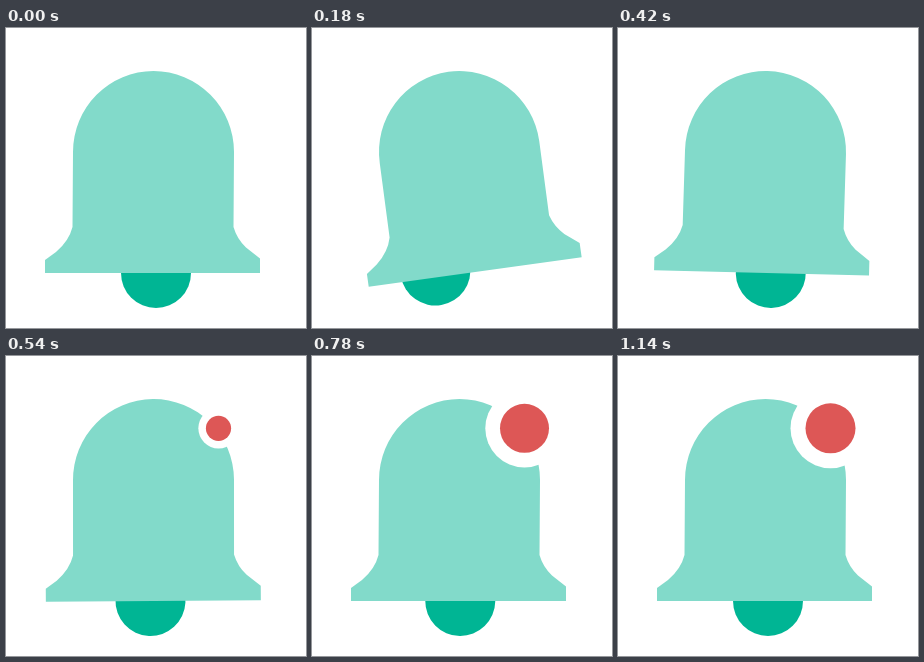
Animation of 300x300 px, one loop 1350 ms. Source, as an HTML page:

```html
<!DOCTYPE html>
<html lang="en">
<head>
<meta charset="utf-8">
<title>Bell notification</title>
<style>
  html, body { margin: 0; width: 100%; height: 100%; overflow: hidden; background: #fff; }
  svg { display: block; width: 100vw; height: 100vh; }
</style>
</head>
<body>
<svg viewBox="0 0 300 300">
  <circle id="clapper" cx="150" cy="245" r="35" fill="#00b594"/>
  <path id="bell" fill="#82daca" d="M39 245V232L50 224Q63 213 66.5 199L67 124A80.5 81 0 0 1 228 124L227.5 199Q231 211 240 219.5L254 230.5V245Z"/>
  <g id="badge">
    <circle r="40" fill="#fff"/>
    <circle r="25" fill="#dd5756"/>
  </g>
</svg>
<script>
  const LOOP = 1350, STEP = 30;
  const [clapper, bell, badge] = ['clapper', 'bell', 'badge'].map(id => document.getElementById(id));

  const smooth = p => p * p * (3 - 2 * p);
  const launch = p => p * p * (2 - p); // soft start, arrives with speed

  // Damped wobble that fades out completely after `life` ms
  function wobble(ms, amp, decay, life) {
    if (ms <= 0 || ms >= life) return 0;
    const s = ms / 1000;
    return amp * Math.sin(2 * Math.PI * 3.3 * s) * Math.exp(-decay * s) * (1 - ms / life);
  }

  // Right, left, then back to rest at the times a, b, c
  function swing(t, size, a, b, c) {
    if (t < a) return size * smooth(t / a);
    if (t < b) return size * (1 - 2 * smooth((t - a) / (b - a)));
    if (t < c) return -size * (1 - launch((t - b) / (c - b)));
    return 0;
  }

  function draw(t) {
    const bellTurn = swing(t, 10, 100, 200, 300) + wobble(t - 300, 7, 5, 300);
    const clapperTurn = swing(t, 16, 150, 300, 430) + wobble(t - 430, 5.7, 3, 700);
    const grow = Math.min(1, Math.max(0, (t - 450) / 150));
    const size = launch(grow) + wobble(t - 600, 0.147, 5, 450);

    bell.setAttribute('transform', `rotate(${bellTurn} 148 124)`);
    clapper.setAttribute('transform', `rotate(${clapperTurn} 148 124)`);
    badge.setAttribute('transform', `translate(212.5 72.3) scale(${size})`);
  }

  const start = performance.now();
  function tick() {
    const t = (performance.now() - start) % LOOP;
    draw(Math.floor(t / STEP) * STEP);
    requestAnimationFrame(tick);
  }
  draw(0);
  requestAnimationFrame(tick);
</script>
</body>
</html>
```
